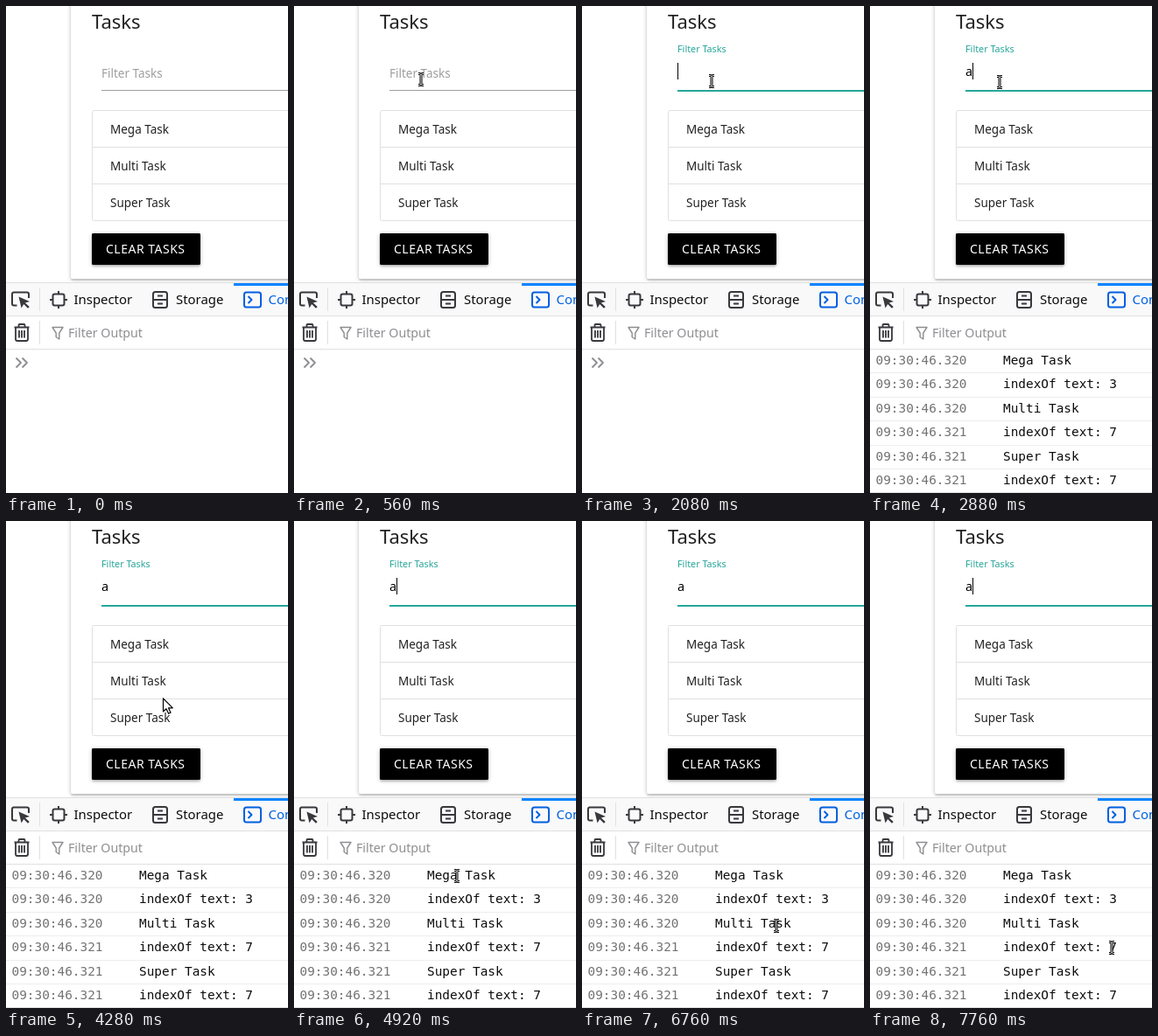
An HTML page with a canvas for the animation above (8 s loop, 322 by 557 pixels).

```html
<!DOCTYPE html>
<html lang="en">
<head>
<meta charset="utf-8">
<title>Task filter</title>
<style>
html, body { margin: 0; width: 100%; height: 100%; overflow: hidden; background: #fff; }
canvas { display: block; width: 322px; height: 557px; }
</style>
</head>
<body>
<canvas id="stage"></canvas>
<script>
const W = 322, H = 557, LOOP = 8000, STEP = 40;
const UI = '"Noto Sans", "Open Sans", sans-serif';
const MONO = '"DejaVu Sans Mono", monospace';
const INK = '#38383d', GRAY = '#8e8e92', BLUE = '#0060df', LINE = '#e0e0e2';
const canvas = document.getElementById('stage');
const ctx = canvas.getContext('2d');
const dpr = window.devicePixelRatio || 1;
canvas.width = W * dpr;
canvas.height = H * dpr;

const clamp = v => Math.max(0, Math.min(1, v));
const mix = (a, b, p) => a + (b - a) * p;
const mixRgb = (a, b, p) => `rgb(${a.map((v, i) => Math.round(mix(v, b[i], p)))})`;
const smooth = p => p * p * (3 - 2 * p);
const easeOut = p => 1 - Math.pow(1 - p, 1.7);

function rect(x, y, w, h, color) {
  ctx.fillStyle = color;
  ctx.fillRect(x, y, w, h);
}

function text(str, x, y, size, color, family = UI, spacing = 0) {
  ctx.font = `${size}px ${family}`;
  ctx.letterSpacing = spacing + 'px';
  ctx.fillStyle = color;
  ctx.fillText(str, x, y);
}

function stroke(d, color, width) {
  ctx.strokeStyle = color;
  ctx.lineWidth = width;
  ctx.stroke(new Path2D(d));
}

function box(x, y, w, h, r, color, width) {
  ctx.beginPath();
  ctx.roundRect(x, y, w, h, r);
  ctx.strokeStyle = color;
  ctx.lineWidth = width;
  ctx.stroke();
}

// Filled panel with stacked shadows given as [dy, blur, alpha]
function panel(x, y, w, h, r, color, shadows) {
  ctx.save();
  ctx.fillStyle = color;
  for (const [dy, blur, alpha] of shadows) {
    ctx.shadowColor = `rgba(0,0,0,${alpha})`;
    ctx.shadowOffsetY = dy * dpr;
    ctx.shadowBlur = blur * dpr;
    ctx.beginPath();
    ctx.roundRect(x, y, w, h, r);
    ctx.fill();
  }
  ctx.restore();
}

// Pointer track: [time, x, y, eased]
const track = [
  [120, 133, -10], [600, 145, 86, 1],
  [2040, 145, 86], [2080, 148, 86], [2120, 148, 87],
  [4040, 148, 87], [4280, 179, 202], [4600, 184, 330], [4880, 192, 405],
  [4920, 186, 406], [5080, 176, 411],
  [5440, 176, 411], [5760, 296, 440, 1],
  [5920, 296, 440], [6080, 291, 442], [6240, 287, 440],
  [6440, 287, 440], [6480, 240, 463],
  [6600, 240, 463], [6760, 222, 463], [6880, 220, 464],
  [7120, 220, 464], [7760, 276, 488, 1]
];

function pointerAt(t) {
  let i = 1;
  while (i < track.length && track[i][0] < t) i++;
  if (i === track.length) return track[i - 1].slice(1, 3);
  const a = track[i - 1], b = track[i];
  let p = clamp((t - a[0]) / (b[0] - a[0]));
  if (b[3]) p = smooth(p);
  return [mix(a[1], b[1], p), mix(a[2], b[2], p)];
}

const logs = ['Mega Task', 'indexOf text: 3', 'Multi Task', 'indexOf text: 7',
              'Super Task', 'indexOf text: 7'];
const rowTop = i => 392 + Math.round(i * 27.4);
const overButton = (x, y) => x > 98 && x < 222 && y > 260 && y < 296;
const overStorage = (x, y) => x > 155 && x < 258 && y > 317 && y < 354;

function pointerKind(x, y) {
  if (overButton(x, y)) return hand;
  if (y > 393) {
    const row = logs[Math.min(5, Math.floor((y - 392) / 27.4))];
    return x > 152 && x < 152 + row.length * 8.66 ? beam : arrow;
  }
  const heading = y > 6 && y < 30 && x < 155;
  return heading || (y > 48 && y < 98) ? beam : arrow;
}

function beam() {
  const d = 'M-3 -6.5H-1.5L0 -5.5L1.5 -6.5H3M0 -5.5V5.5M-3 6.5H-1.5L0 5.5L1.5 6.5H3';
  stroke(d, '#000', 3);
  stroke(d, '#fff', 0.9);
}

function outlined(d) {
  ctx.fillStyle = '#fff';
  ctx.fill(new Path2D(d));
  stroke(d, '#000', 1.2);
}

function arrow() {
  outlined('M.5 .8V16L4 12.8L6.6 18.3L9 17.2L6.5 11.8H11.3Z');
}

function hand() {
  outlined('M-1.5 0Q0 -2 1.5 0V6L9 8Q11 9 10 13L8 18H0L-5 11Q-5 8 -1.5 10Z');
}

function drawPage(t, x, y) {
  panel(74, -20, 300, 332, 2, '#fff', [[2, 2, .14], [1, 5, .22]]);
  text('Tasks', 98, 26, 22, 'rgba(0,0,0,.87)');

  const label = easeOut(clamp((t - 1160) / 200));
  const focus = easeOut(clamp((t - 1160) / 300));
  const gray = [158, 158, 158], teal = [38, 166, 154];
  text('Filter Tasks', 109, mix(82, 53, label), mix(13.5, 10.8, label), mixRgb(gray, teal, label));
  rect(109, 96, 213, 1, mixRgb(gray, teal, focus));
  rect(109, 97, 213, 1, `rgba(38,166,154,${focus})`);

  const typed = t >= 2720;
  if (typed) text('a', 109, 80, 14.5, '#000');
  const caret = (t >= 1200 && t < 2360) || (t >= 2720 && t < 3560) ||
                (t >= 4760 && t < 5960) || t >= 7160;
  if (caret) rect(typed ? 117 : 109, 65, 1, 19, '#000');

  box(98.5, 119.5, 260, 126, 2, '#e0e0e0', 1);
  ['Mega Task', 'Multi Task', 'Super Task'].forEach((name, i) => {
    if (i) rect(99, 119 + i * 42, 223, 1, '#e0e0e0');
    text(name, 119, 146 + i * 42, 13.5, 'rgba(0,0,0,.87)');
  });

  const lift = overButton(x, y) ? 1 : 0;
  panel(98, 260, 124, 36, 2, '#000', [[2 + lift, 2 + lift, .14], [1, 5 + 2 * lift, .25]]);
  text('CLEAR TASKS', 114, 283, 14, '#fff', UI, .5);
}

function drawIcons() {
  // element picker
  stroke('M12.5 342.5H9Q7 342.5 7 340.5V329.5Q7 327.5 9 327.5H24Q26 327.5 26 329.5V334', INK, 2);
  ctx.fillStyle = INK;
  ctx.fill(new Path2D('M14.5 332.5L27 338L21.8 339.6L26.8 344L25 345.8L20.2 341L17.6 345.5Z'));
  // inspector
  box(53.5, 329.5, 13, 13, 2, INK, 2);
  stroke('M60 326V329M60 343V346M50 336H53M67 336H70', INK, 2);
  // storage
  box(168, 327, 16, 18, 2.5, INK, 2);
  stroke('M168 336H184M173 331.5H179M173 340.5H179', INK, 1.8);
  // console
  box(272, 327.5, 19, 17, 2.5, BLUE, 2);
  stroke('M276.5 332L280.5 336L276.5 340', BLUE, 2);
  // trash
  stroke('M9.5 367.5H26.5M14.5 367V365Q14.5 364 15.5 364H20.5Q21.5 364 21.5 365V367', INK, 1.8);
  stroke('M11 368V381Q11 383 13 383H23Q25 383 25 381V368M15 371V379.5M18 371V379.5M21 371V379.5', INK, 1.8);
  // filter funnel
  stroke('M53 367.5H65L60.8 374V381L57.2 378.5V374Z', GRAY, 1.4);
}

function drawTools(t, x, y) {
  rect(0, 316, W, 241, '#fff');
  rect(0, 317, W, 37, '#f9f9fa');
  if (overStorage(x, y)) rect(156, 317, 102, 37, '#ededf0');
  for (const top of [316, 354, 392]) rect(0, top, W, 1, LINE);
  rect(38, 322, 1, 27, LINE);
  rect(38, 360, 1, 27, LINE);
  rect(260, 317, 62, 3, '#0a84ff');
  drawIcons();
  text('Inspector', 77.5, 341, 14.9, '#0c0c0d');
  text('Storage', 194, 341, 14.9, '#0c0c0d');
  text('Console', 299.5, 341, 14.9, BLUE);
  text('Filter Output', 71, 379, 14.2, GRAY);

  if (t < 2880) {
    stroke('M11.5 402.5L17 408L11.5 413.5M18.5 402.5L24 408L18.5 413.5', GRAY, 1.8);
    return;
  }
  logs.forEach((line, i) => {
    const top = rowTop(i);
    text('09:30:46.32' + (i < 3 ? 0 : 1), 6.5, top + 18, 14.4, '#737373', MONO);
    text(line, 152, top + 18, 14.4, '#0c0c0d', MONO);
    rect(0, rowTop(i + 1), W, 1, i < 5 ? '#ededf0' : LINE);
  });
}

function draw(now) {
  const t = Math.floor((now % LOOP) / STEP) * STEP;
  const [x, y] = t < 160 ? [-99, -99] : pointerAt(t);
  ctx.setTransform(dpr, 0, 0, dpr, 0, 0);
  ctx.lineJoin = 'round';
  ctx.lineCap = 'butt';
  rect(0, 0, W, H, '#fff');
  drawPage(t, x, y);
  drawTools(t, x, y);
  if (t >= 160) {
    ctx.translate(Math.round(x), Math.round(y));
    pointerKind(x, y)();
  }
}

const start = performance.now();
function tick() {
  draw(performance.now() - start);
  requestAnimationFrame(tick);
}
tick();
</script>
</body>
</html>
```
